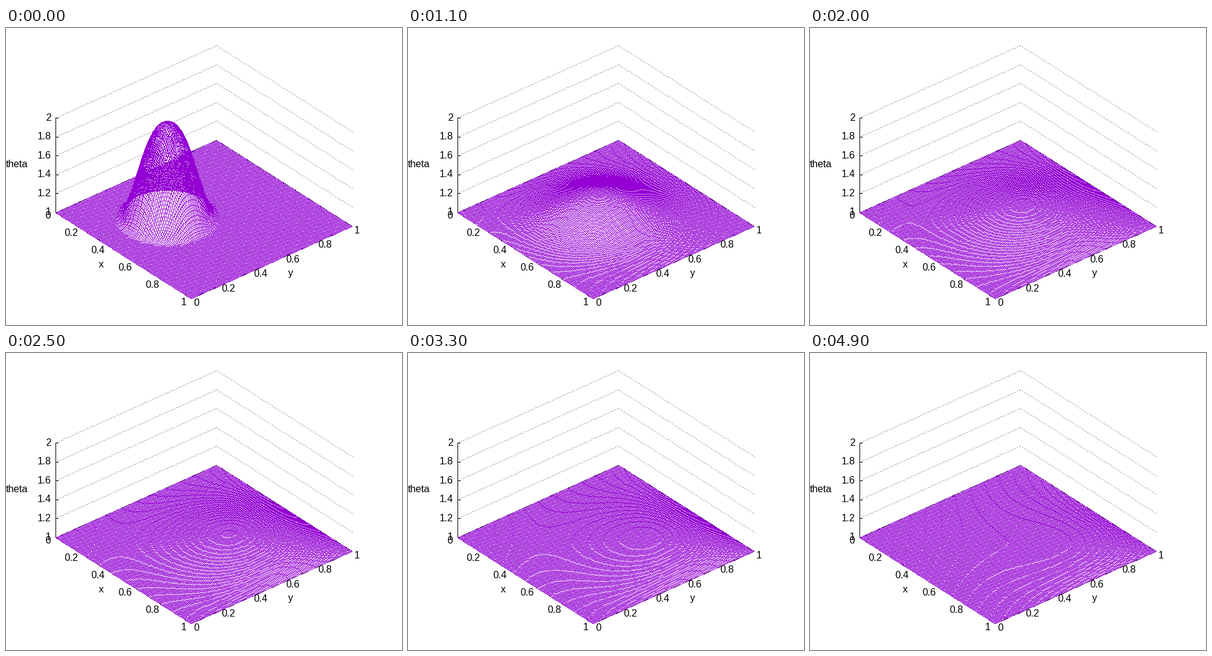
Write a matplotlib script that moves like this. It is 640 px wide and 480 px high and loops after 5 s.

```python
import numpy as np
import matplotlib.pyplot as plt
from matplotlib.animation import FuncAnimation

W, H, DPI = 640, 480, 100
FRAMES, INTERVAL = 50, 100
PURPLE, BLACK, GREY = (148, 0, 211), (0, 0, 0), (90, 90, 90)

# Advection and diffusion of a hump, theta = 1 on all walls
N = 128
SPEED, DIFFUSION = 0.1, 0.0145
START, RADIUS = 0.377, 0.26
SUBSTEPS = 100

grid = np.linspace(0, 1, N + 1)
gx, gy = np.meshgrid(grid, grid, indexing="ij")


def project(x, y, z):
    """Screen position, in whole pixels, of a point in the plot's box."""
    sx = 80 + 219 * x + 260 * y
    sy = 298 + 139 * x - 117 * y - 153 * (z - 1)
    return np.floor(np.stack([sx, sy], axis=-1) + 0.5).astype(int)


def stroke(img, a, b, color, period=1):
    """Draw one-pixel lines from points a to points b without smoothing."""
    a, b = np.reshape(a, (-1, 1, 2)), np.reshape(b, (-1, 1, 2))
    length = np.maximum(np.abs(b - a).max(axis=2, keepdims=True), 1)
    step = np.arange(0, length.max() + 1, period).reshape(1, -1, 1)
    part = np.minimum(step / length, 1)
    p = np.floor(a + (b - a) * part + 0.5).astype(int)
    img[p[..., 1], p[..., 0]] = color


def line(img, start, end, color, period=1):
    stroke(img, project(*start), project(*end), color, period)


def time_step():
    """Matrix that advances one axis of the field by one frame."""
    h = 1 / N
    n = N - 1
    lower, upper = np.eye(n, k=-1), np.eye(n, k=1)
    rate = (DIFFUSION * (lower - 2 * np.eye(n) + upper) / h**2
            - SPEED * (upper - lower) / (2 * h))
    dt = INTERVAL / 1000 / SUBSTEPS
    return np.linalg.matrix_power(np.eye(n) + dt * rate, SUBSTEPS)


def solve():
    r = np.hypot(gx - START, gy - START) / RADIUS
    u = (np.clip(1 - r**2.5, 0, None) ** 3)[1:-1, 1:-1]
    step = time_step()
    fields = []
    for _ in range(FRAMES):
        fields.append(1 + np.pad(u, 1))
        u = step @ u @ step.T
    return fields


def draw_back():
    img = np.full((H, W, 3), 255, np.uint8)
    for z in (1.2, 1.4, 1.6, 1.8, 2.0):
        line(img, (0, 0, z), (0, 1, z), GREY, 3)
        line(img, (0, 1, z), (1, 1, z), GREY, 3)
    corners = [(0, 0, 1), (1, 0, 1), (1, 1, 1), (0, 1, 1)]
    for a, b in zip(corners, corners[1:] + corners[:1]):
        line(img, a, b, BLACK)
    line(img, (0, 0, 1), (0, 0, 2), BLACK)
    for z in np.linspace(1, 2, 6):
        tick = project(0, 0, z)
        stroke(img, tick, tick + [4, 0], BLACK)
    return img


fields = solve()
back = draw_back()


def render(frame):
    img = back.copy()
    p = project(gx, gy, fields[frame])
    stroke(img, p[:-1], p[1:], PURPLE)
    stroke(img, p[:, :-1], p[:, 1:], PURPLE)
    return img


fig = plt.figure(figsize=(W / DPI, H / DPI), dpi=DPI, facecolor="white")
ax = fig.add_axes([0, 0, 1, 1])
ax.axis("off")
picture = ax.imshow(render(0), extent=(0, W, H, 0), aspect="auto",
                    interpolation="nearest")


def label(x, y, text, ha):
    ax.text(x, y, text, ha=ha, va="baseline", color="black",
            family="Liberation Sans", fontsize=16 * 72 / DPI)


for k in range(6):
    value = f"{k / 5:g}"
    label(72.5 + 43.8 * k, 308 + 28 * k, value, "right")
    label(307.5 + 52 * k, 449 - 23.4 * k, value, "center")
    label(73, 302.5 - 30.6 * k, f"{1 + k / 5:g}", "right")
label(154, 387, "x", "center")
label(460, 401, "y", "center")
label(0, 225, "theta", "left")


def update(frame):
    picture.set_data(render(frame))
    return (picture,)


animation = FuncAnimation(fig, update, frames=FRAMES, interval=INTERVAL,
                          repeat=True, repeat_delay=0)
plt.show()
```
